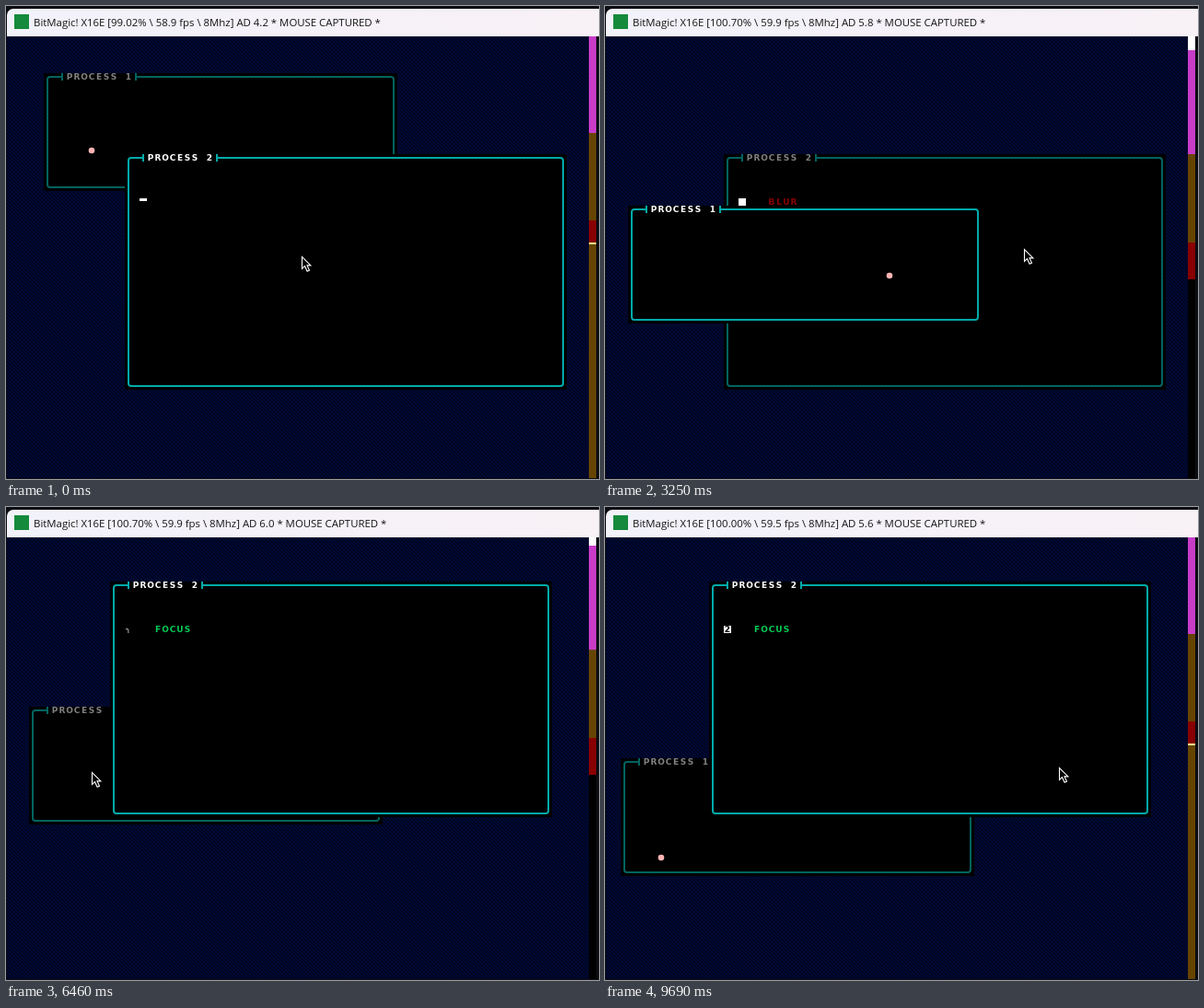
An HTML page with a canvas that plays this animation: 644x514 px, repeating every 9710 ms.

```html
<!DOCTYPE html>
<html lang="en">
<head>
<meta charset="utf-8">
<title>Two processes</title>
<style>
  html, body { margin: 0; width: 100%; height: 100%; overflow: hidden; background: #0b0b12; }
  canvas { display: block; }
</style>
</head>
<body>
<canvas id="stage" width="644" height="514"></canvas>
<script>
const ctx = document.getElementById('stage').getContext('2d');
const LOOP = 9710, CELL = 8, LEFT = 1, TOP = 33;

// Each row: time, then values
const COUNTERS = [ // video frames, ball steps, raster offset
  [0, 0, 0, 0], [1380, 92, 92, 6], [3250, 209, 209, 8], [4340, 280, 279, 0],
  [5540, 358, 356, 2], [7380, 481, 475, 2], [9690, 628, 621, 0]
];
const POINTER = [
  [0, 321, 272], [500, 330, 240], [1150, 260, 130], [1380, 282, 90],
  [1550, 268, 77], [1970, 258, 130], [2400, 236, 190], [2850, 252, 221],
  [3250, 455, 264], [3600, 450, 235], [4340, 428, 207], [4850, 395, 164],
  [5100, 291, 190], [5540, 379, 84], [5800, 379, 84], [6500, 90, 290],
  [7380, 147, 216], [8000, 139, 272], [8550, 420, 280], [9690, 493, 283]
];
const STATUS = [
  [0, '99.02', '58.9', '4.2'], [700, '99.90', '59.5', '4.7'],
  [2700, '100.70', '59.9', '5.8'], [3800, '99.02', '58.9', '5.3'],
  [5000, '100.70', '59.9', '6.0'], [6600, '100.50', '59.8', '3.8'],
  [8700, '100.00', '59.5', '5.6']
];
const FOCUS = [[0, 2], [1150, 1], [3600, 2], [6500, 1], [8550, 2]];
const DRAGS = [
  { id: 1, start: 1550, end: 2850 },
  { id: 2, start: 4850, end: 5600 },
  { id: 1, start: 7380, end: 8000 }
];
const WINDOWS = {
  1: { col: 5, row: 5, cols: 48, rows: 16 },
  2: { col: 16, row: 16, cols: 60, rows: 32 }
};
const CHARSET = [...'@ABCDEFGHIJKLMNOPQRSTUVWXYZ[£]↑← !"#$%&\'()*+,-./0123456789:;<=>?' +
  '─♠│─▔▔▁▏▕╮╰╯┗╲╱┏┓●▁♥▏╭╳○♣▕♦┼▒│π◥ ▌▄▔▁▏▒▕▒◤▕├▗└┐▂┌┴┬┤▏▎▕▔▀▃✓▖▝┘▘▚'];

const smooth = k => k * k * (3 - 2 * k);
const latest = (rows, t) => rows.findLast(row => row[0] <= t);

function track(rows, t, ease = k => k) {
  const next = rows.findIndex(row => row[0] > t);
  if (next < 0) return rows.at(-1).slice(1);
  const a = rows[next - 1], b = rows[next];
  const k = ease((t - a[0]) / (b[0] - a[0]));
  return a.slice(1).map((v, i) => v + (b[i + 1] - v) * k);
}

const pointerAt = t => track(POINTER, t, smooth);

function bounce(step, span) {
  const phase = step % (2 * span);
  return 1 + Math.min(phase, 2 * span - phase);
}

function rect(x, y, w, h, color) {
  ctx.fillStyle = color;
  ctx.fillRect(x, y, w, h);
}

function text(string, x, y, color) {
  ctx.font = 'bold 9px "DejaVu Sans", sans-serif';
  ctx.textAlign = 'center';
  ctx.fillStyle = color;
  [...string].forEach((ch, i) => ctx.fillText(ch, x + i * CELL + 4, y + 7));
}

function makeBackdrop() {
  const tile = document.createElement('canvas');
  tile.width = tile.height = 4;
  const g = tile.getContext('2d');
  for (let y = 0; y < 4; y++) for (let x = 0; x < 4; x++) {
    g.fillStyle = (x - y + 4) % 4 < 2 ? '#000a3a' : '#00041c';
    g.fillRect(x, y, 1, 1);
  }
  return ctx.createPattern(tile, 'repeat');
}
const backdrop = makeBackdrop();

function windowOrigin(id, t) {
  let { col, row } = WINDOWS[id];
  for (const drag of DRAGS) {
    if (drag.id !== id || t < drag.start) continue;
    const from = pointerAt(drag.start), to = pointerAt(Math.min(t, drag.end));
    col += Math.round((to[0] - from[0]) / CELL);
    row += Math.round((to[1] - from[1]) / CELL);
  }
  return [LEFT + col * CELL, TOP + row * CELL];
}

function drawFrame(id, x, y, active) {
  const { cols, rows } = WINDOWS[id], line = active ? '#00aaaa' : '#006460';
  rect(x, y, cols * CELL, rows * CELL, '#000');
  ctx.strokeStyle = line;
  ctx.lineWidth = 2;
  ctx.beginPath();
  ctx.roundRect(x + 4, y + 4, (cols - 1) * CELL, (rows - 1) * CELL, 3);
  ctx.stroke();
  rect(x + 20, y, 80, CELL, '#000');
  rect(x + 19, y, 2, CELL, line);
  rect(x + 99, y, 2, CELL, line);
  text('PROCESS ' + id, x + 24, y, active ? '#fff' : '#808080');
}

function drawBall(x, y, step) {
  ctx.fillStyle = '#ffb4b4';
  ctx.beginPath();
  ctx.arc(x + bounce(step + 5, 45) * CELL + 4, y + bounce(step + 17, 13) * CELL + 4, 3.3, 0, 7);
  ctx.fill();
}

function drawSymbol(code, x, y) {
  const shape = code % 128, inverse = code > 127;
  const ink = inverse ? '#000' : '#fff';
  if (inverse) rect(x, y, CELL, CELL, '#fff');
  if (shape === 120) rect(x, y, CELL, 3, ink);
  else if (shape === 104) {
    for (let i = 0; i < 8; i++) rect(x + (i >> 1) * 2, y + 4 + (i % 2) * 2, i % 4 === 0 || i % 4 === 3 ? 2 : 0, 2, ink);
  } else {
    ctx.save();
    ctx.beginPath();
    ctx.rect(x, y, CELL, CELL);
    ctx.clip();
    text(CHARSET[shape], x, y, ink);
    ctx.restore();
  }
}

function drawRaster(frame, offset, dragging) {
  const magenta = '#c83cc8', brown = '#664400', red = '#880000', green = '#00cc55';
  const pale = '#ffee88', white = '#fff';
  const top = Math.round(offset);
  let bands; // colour and lower edge, from the top down
  if (dragging) {
    bands = [[green, 69], [white, 80], ['#aaff66', 111], [green, 113], [white, 138],
      [pale, 140], [brown, 397], [red, 423], [magenta, 513]];
  } else if (frame % 2) {
    bands = [[white, 40 + top], [magenta, 153 + top], [brown, 249 + top],
      [red, 289 + top], ['#000', 513]];
  } else {
    bands = [[magenta, 138 + top], [brown, 233 + top], [red, 257 + top],
      [pale, 259 + top], [brown, 513]];
  }
  let y = TOP;
  for (const [color, end] of bands) {
    rect(633, y, 8, end - y, color);
    y = end;
  }
}

function drawTitleBar(t) {
  const fill = ctx.createLinearGradient(0, 0, 644, 0);
  fill.addColorStop(0, '#f2f2fa');
  fill.addColorStop(1, '#f8f1f6');
  ctx.fillStyle = fill;
  ctx.beginPath();
  ctx.roundRect(1, 3, 660, 30, [7, 0, 0, 0]);
  ctx.fill();
  rect(9, 9, 16, 16, '#158a3c');
  const [, percent, fps, load] = latest(STATUS, t);
  ctx.font = '11.4px "Open Sans", sans-serif';
  ctx.textAlign = 'left';
  ctx.fillStyle = '#151515';
  ctx.fillText(`BitMagic! X16E [${percent}% \\ ${fps} fps \\ 8Mhz] AD ${load} * MOUSE CAPTURED *`, 30, 22);
}

function drawPointer([x, y]) {
  ctx.save();
  ctx.translate(Math.round(x) + .5, Math.round(y) + .5);
  const arrow = new Path2D('M0 0V13L3 10.2L5.6 15.8L8 14.7L5.5 9.4H9.4Z');
  ctx.fillStyle = '#000';
  ctx.strokeStyle = '#fff';
  ctx.lineWidth = 1.1;
  ctx.fill(arrow);
  ctx.stroke(arrow);
  ctx.restore();
}

function draw(t) {
  const [frames, steps, offset] = track(COUNTERS, t);
  const frame = Math.floor(frames), focused = latest(FOCUS, t)[1];
  rect(0, 0, 644, 514, '#0b0b12');
  drawTitleBar(t);
  rect(LEFT, TOP, 632, 480, backdrop);

  for (const id of [3 - focused, focused]) {
    const [x, y] = windowOrigin(id, t), active = id === focused;
    drawFrame(id, x, y, active);
    if (id === 1) {
      drawBall(x, y, Math.floor(steps));
    } else {
      drawSymbol((120 + (frame >> 1)) % 256, x + 16, y + 48);
      if (t >= FOCUS[1][0]) {
        text(active ? 'FOCUS' : 'BLUR', x + 48, y + 48, active ? '#00cc55' : '#880000');
      }
    }
  }

  drawRaster(frame, offset, DRAGS.some(d => t > d.start && t < d.end));
  drawPointer(pointerAt(t));
}

function tick() {
  draw(performance.now() % LOOP);
  requestAnimationFrame(tick);
}
tick();
</script>
</body>
</html>
```
